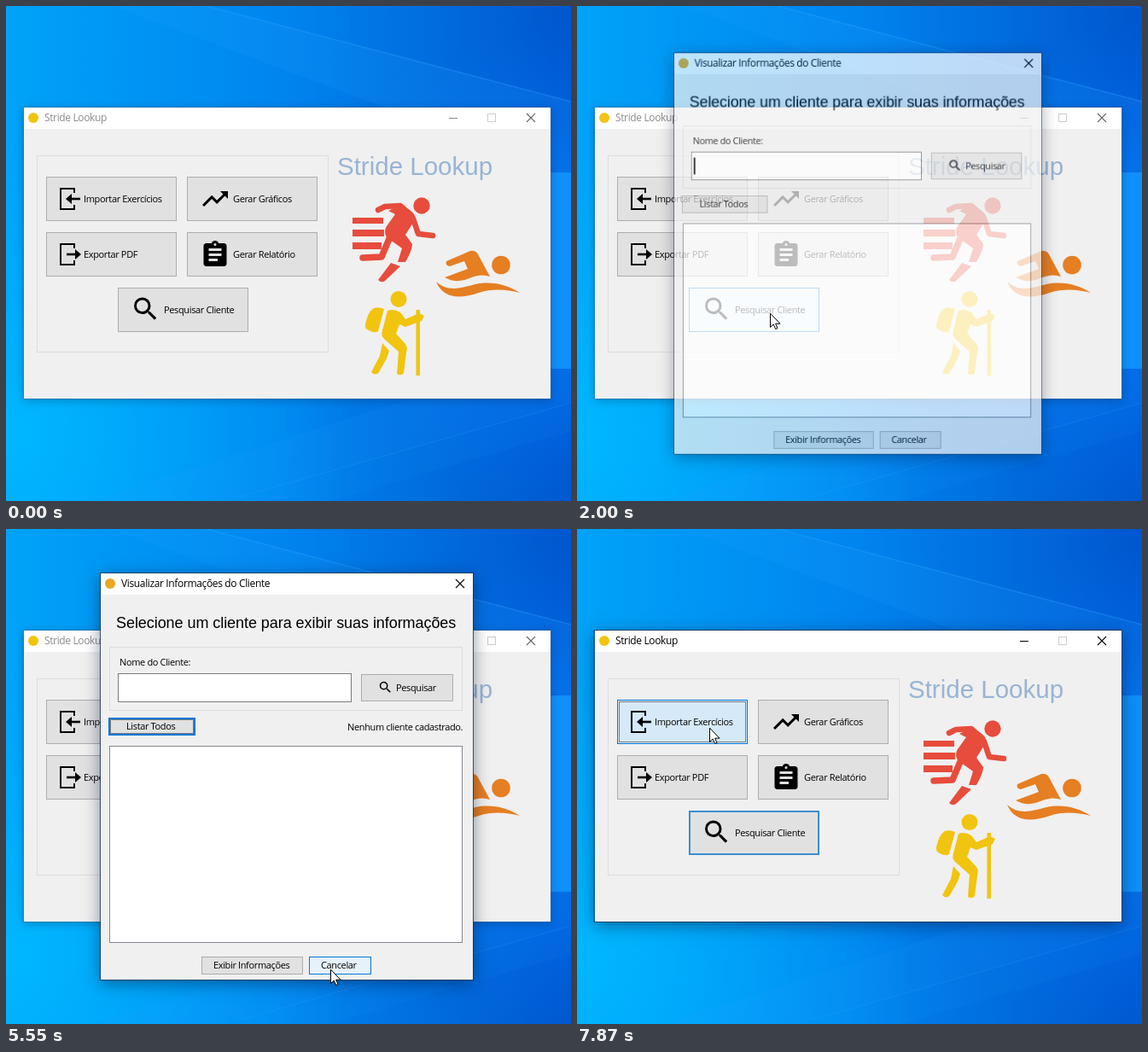
An HTML page with a canvas that plays this animation: 662 px wide and 580 px high, repeating every 8 s.

```html
<!DOCTYPE html>
<html lang="pt">
<head>
<meta charset="utf-8">
<title>Stride Lookup</title>
<style>
html, body { margin: 0; width: 100%; height: 100%; overflow: hidden; background: #0086f0; }
canvas { display: block; }
</style>
</head>
<body>
<canvas id="stage" width="662" height="580"></canvas>
<script>
const W = 662, H = 580, LOOP = 8000, TICK = 77.26;
const APP = 'Stride Lookup';
const UI = '11px "Open Sans", "Noto Sans", sans-serif';
const CAPTION = '12px "Open Sans", "Noto Sans", sans-serif';
const ARIAL = '"Liberation Sans", Arial, sans-serif';
const BLUE = [0, 120, 215];

const layer = () => Object.assign(document.createElement('canvas'), { width: W, height: H });
const screen = document.getElementById('stage').getContext('2d');
const wallpaper = layer(), dialogLayer = layer();

const clamp = v => Math.max(0, Math.min(1, v));
const ramp = (k, a, b) => clamp((k - a) / (b - a));
const within = (k, a, b) => k >= a && k <= b;
const ease = p => p * p * (3 - 2 * p);
const mix = (a, b, p) => `rgb(${a.map((v, i) => Math.round(v + (b[i] - v) * p))})`;

// ---------- drawing helpers ----------
function box(g, x, y, w, h, fill, border) {
  if (fill) { g.fillStyle = fill; g.fillRect(x, y, w, h); }
  if (border) { g.strokeStyle = border; g.lineWidth = 1; g.strokeRect(x + .5, y + .5, w - 1, h - 1); }
}

function text(g, str, x, y, font = UI, color = '#000', spacing = -.36) {
  g.font = font;
  g.fillStyle = color;
  g.letterSpacing = spacing + 'px';
  g.fillText(str, x, y);
}

function line(g, pts, width, color, cap = 'round') {
  g.beginPath();
  pts.forEach(p => g.lineTo(...p));
  g.lineWidth = width;
  g.strokeStyle = color;
  g.lineCap = cap;
  g.lineJoin = cap === 'round' ? 'round' : 'miter';
  g.stroke();
}

function shape(g, d, color) {
  g.fillStyle = color;
  g.fill(new Path2D(d), 'evenodd');
}

function dot(g, x, y, r, color) {
  g.beginPath();
  g.arc(x, y, r, 0, 7);
  g.fillStyle = color;
  g.fill();
}

function icon(g, d, x, y, scale) {
  g.save();
  g.translate(x, y);
  g.scale(scale, scale);
  shape(g, d, '#000');
  g.restore();
}

const SEARCH = 'M15.5 14h-.79l-.28-.27A6.47 6.47 0 0 0 16 9.5 6.5 6.5 0 1 0 9.5 16c1.61 0 3.09-.59 4.23-1.57l.27.28v.79l5 4.99L20.49 19zm-6 0C7 14 5 12 5 9.5S7 5 9.5 5 14 7 14 9.5 12 14 9.5 14z';
const TREND = 'M16 6l2.29 2.29-4.88 4.88-4-4L2 16.59 3.41 18l6-6 4 4 6.3-6.29L22 12V6z';
const REPORT = 'M19 3h-4.18C14.4 1.84 13.3 1 12 1s-2.4.84-2.82 2H5c-1.1 0-2 .9-2 2v14c0 1.1.9 2 2 2h14c1.1 0 2-.9 2-2V5c0-1.1-.9-2-2-2zm-7 0a1 1 0 0 1 0 2 1 1 0 0 1 0-2zm2 14H7v-2h7zm3-4H7v-2h10zm0-4H7V7h10z';

function doorIcon(g, y, out) {
  line(g, [[80, y - 7], [80, y - 12], [64, y - 12], [64, y + 12], [80, y + 12], [80, y + 7]], 2, '#000', 'butt');
  line(g, out ? [[71, y], [82, y]] : [[76, y], [87, y]], 2.6, '#000', 'butt');
  shape(g, out ? `M81 ${y - 6}L88 ${y}L81 ${y + 6}z` : `M77 ${y - 6}L70 ${y}L77 ${y + 6}z`, '#000');
}

function button(g, x, y, w, h, { hot = 0, press = 0, focus = false, glow = 0 } = {}) {
  const base = [225, 225, 225], warm = [229, 241, 251];
  const fill = press ? mix(warm, [204, 228, 247], press) : mix(base, warm, hot);
  box(g, x, y, w, h, fill, mix([173, 173, 173], BLUE, Math.max(hot, press, glow)));
  if (glow) box(g, x + 1, y + 1, w - 2, h - 2, null, mix(base, BLUE, glow));
  if (focus) {
    g.setLineDash([1, 1]);
    box(g, x + 2, y + 2, w - 4, h - 4, null, '#111');
    g.setLineDash([]);
  }
}

function frame(g, x, y, w, h, titleHeight, active) {
  g.save();
  g.shadowColor = `rgba(0,20,50,${active ? .5 : .3})`;
  g.shadowBlur = active ? 18 : 10;
  g.shadowOffsetY = active ? 4 : 2;
  box(g, x, y, w, h, '#f0f0f0');
  g.restore();
  box(g, x, y, w, titleHeight, '#fff');
  box(g, x - 1, y - 1, w + 2, h + 2, null, active ? 'rgba(25,50,75,.8)' : 'rgba(70,100,130,.45)');
}

function cross(g, x, y, color) {
  line(g, [[x - 5, y - 5], [x + 5, y + 5]], 1.1, color, 'butt');
  line(g, [[x + 5, y - 5], [x - 5, y + 5]], 1.1, color, 'butt');
}

// ---------- wallpaper ----------
function paintWallpaper(g) {
  const fill = (gradient, ...stops) => {
    stops.forEach(([at, color]) => gradient.addColorStop(at, color));
    g.fillStyle = gradient;
    g.fillRect(0, 0, W, H);
  };
  fill(g.createLinearGradient(0, 0, W, 0), [0, '#00a3f8'], [.5, '#0084ef'], [1, '#0056ce']);
  fill(g.createRadialGradient(0, 500, 0, 0, 500, 400), [0, 'rgba(0,186,255,.9)'], [1, 'rgba(0,170,255,0)']);
  fill(g.createRadialGradient(W, 310, 0, W, 310, 290), [0, 'rgba(0,130,255,.75)'], [1, 'rgba(0,120,255,0)']);
  const beam = (d, alpha) => shape(g, d, `rgba(40,160,255,${alpha})`);
  beam('M235 0L662 112V200L125 0z', .13);
  line(g, [[235, 0], [662, 112]], 1.5, 'rgba(60,170,255,.3)');
  beam('M260 580L662 465V400L100 580z', .1);
  beam('M380 580L662 498V465L260 580z', .06);
  line(g, [[275, 575], [662, 465]], 1.2, 'rgba(60,170,255,.18)');
  box(g, 613, 195, 230, 230, '#0f90fa');
}

// ---------- sport figures ----------
function runner(g) {
  const c = '#e74c3c';
  dot(g, 487, 234, 9.7, c);
  box(g, 406, 248, 36, 7, c);
  box(g, 406, 262, 37, 8, c);
  box(g, 406, 277, 34, 8, c);
  line(g, [[436, 239], [444, 235], [462, 234], [472, 243]], 6.5, c);
  shape(g, 'M460 234Q478 238 480 249L468 268L476 279Q476 286 468 300H459L464 284L446 271Q442 264 446 258L456 244L448 240z', c);
  line(g, [[477, 249], [483, 267], [500, 269]], 6.5, c);
  line(g, [[451, 268], [440, 294], [418, 295]], 7.5, c);
  shape(g, 'M451 301L462 305L444 322Q440 325 436 321z', c);
}

function swimmer(g) {
  const c = '#e67e22';
  dot(g, 580, 303.5, 10.8, c);
  shape(g, 'M516 299L544 287Q550 286 553 291L567 317Q556 313 543 319Q528 326 514 318L541 308L537 299L520 305Q514 304 516 299z', c);
  shape(g, 'M504 323C518 336 534 330 550 326C570 322 588 327 602 336C586 332 570 331 554 336C530 344 512 342 504 323z', c);
}

function hiker(g) {
  const c = '#f1c40f';
  dot(g, 460, 343.5, 9.5, c);
  shape(g, 'M421 373Q424 358 431 354Q437 352 443 355L436 381Q432 384 425 380Q420 378 421 373z', c);
  shape(g, 'M447 357Q454 354 462 359L468 367L484 360L490 363L487 369L468 376L461 373L457 384L468 396Q471 400 469 406L466 430Q463 434 458 431L460 405L443 390Q439 386 441 380z', c);
  shape(g, 'M441 395L449 404L446 413L437 429Q433 434 428 429L438 410z', c);
  box(g, 480.5, 356, 4.5, 77, c);
}

// ---------- windows ----------
function mainWindow(g, k) {
  const active = within(k, 14, 16) || k >= 74;
  const ink = active ? '#000' : '#8c8c8c';
  frame(g, 21, 119, 617, 341, 25, active);
  dot(g, 32, 131, 6, '#f1c40f');
  text(g, APP, 45, 135, CAPTION, ink);
  line(g, [[519, 131.5], [529, 131.5]], 1, ink, 'butt');
  box(g, 564, 126, 10, 10, null, '#ccc');
  cross(g, 615, 131, active ? '#000' : '#666');

  box(g, 36, 175, 342, 231, null, '#dcdcdc');
  button(g, 47, 200, 153, 52, {
    hot: ramp(k, 87, 91),
    press: k >= 95 ? .6 : k >= 91 ? 1 : 0,
    focus: k >= 91
  });
  button(g, 212, 200, 153, 52);
  button(g, 47, 265, 153, 52);
  button(g, 212, 265, 153, 52);
  button(g, 131, 330, 153, 52, {
    hot: ramp(k, 5, 7) * (1 - ramp(k, 76, 88)),
    press: within(k, 14, 16) ? 1 : 0,
    focus: within(k, 14, 16) || within(k, 74, 90),
    glow: k >= 78 ? .78 + .15 * Math.cos((k - 78) / 4) : 0
  });
  doorIcon(g, 226, false);
  doorIcon(g, 291, true);
  icon(g, TREND, 227, 208, 1.5);
  icon(g, REPORT, 227, 273.5, 1.5);
  icon(g, SEARCH, 145.5, 337, 1.5);
  text(g, 'Importar Exercícios', 91, 230);
  text(g, 'Gerar Gráficos', 266, 230);
  text(g, 'Exportar PDF', 91, 295);
  text(g, 'Gerar Relatório', 266, 295);
  text(g, 'Pesquisar Cliente', 185, 360);

  text(g, APP, 388, 198, '29.5px ' + ARIAL, '#98b4d4', 0);
  runner(g);
  swimmer(g);
  hiker(g);
}

function dialog(g, k) {
  g.clearRect(0, 0, W, H);
  frame(g, 111, 52, 436, 476, 25, k < 74);
  dot(g, 122, 64, 6, '#e9a820');
  text(g, 'Visualizar Informações do Cliente', 135, 68, CAPTION);
  cross(g, 532, 64, '#000');
  text(g, 'Selecione um cliente para exibir suas informações', 129, 116, '18px ' + ARIAL, '#000', -.06);

  box(g, 121, 138, 414, 75, null, '#dcdcdc');
  text(g, 'Nome do Cliente:', 133, 160);
  box(g, 131, 169, 274, 34, '#fff', '#7a7a7a');
  if (k < 24 || within(k, 31, 37)) box(g, 134, 176, 2, 20, '#000');
  button(g, 416, 170, 108, 32);
  icon(g, SEARCH, 435.5, 176.5, .75);
  text(g, 'Pesquisar', 457, 190);

  button(g, 120, 221, 102, 21, {
    hot: ramp(k, 36, 39) * (1 - ramp(k, 52, 60)),
    press: within(k, 41, 43) ? .35 : 0,
    focus: within(k, 41, 71),
    glow: within(k, 52, 71) ? .92 + .08 * Math.cos((k - 65) / 3) : 0
  });
  text(g, 'Listar Todos', 141, 235);
  if (k >= 44) text(g, 'Nenhum cliente cadastrado.', 400, 236);
  box(g, 121, 254, 414, 231, '#fff', '#828790');

  button(g, 229, 501, 119, 21);
  text(g, 'Exibir Informações', 243, 515);
  button(g, 355, 501, 73, 21, {
    hot: ramp(k, 58, 61),
    press: within(k, 72, 74) ? 1 : 0,
    focus: k >= 72,
    glow: k >= 75 ? 1 : 0
  });
  text(g, 'Cancelar', 369, 515);
}

function showDialog(g, k) {
  const closing = k > 73;
  const since = (k - 17) * TICK;
  const alpha = closing ? 1 - (k - 73) * .287 : clamp(since / 210);
  const scale = closing ? 1 - (k - 73) * .0146 : 1 - .1 * (1 - clamp(since / 245)) ** 2;
  if (alpha <= 0) return;
  dialog(dialogLayer.getContext('2d'), k);
  g.save();
  g.globalAlpha = alpha;
  g.translate(328.5, 289.5);
  g.scale(scale, scale);
  g.drawImage(dialogLayer, -328.5, -289.5);
  g.restore();
}

// ---------- pointer ----------
const MOVES = [
  { from: 0, to: 8, a: [467, 480], b: [226, 360] },
  { from: 27, to: 38, a: [226, 360], b: [188, 232] },
  { from: 50, to: 61, a: [188, 232], b: [380, 516] },
  { from: 79, to: 90, a: [380, 516], b: [155, 233] }
];
const CLICKS = [[14, 16], [41, 43], [72, 74], [91, 94]];
const ARROW = new Path2D('M.5.5V16.5L4.2 13L6.7 18.5L9 17.5L6.6 12.2H11.6z');

function pointer(g, k) {
  if (k < 0) return;
  const { from, to, a, b } = MOVES.filter(m => k >= m.from).pop();
  const p = ease(ramp(k, from, to));
  const x = a[0] + (b[0] - a[0]) * p, y = a[1] + (b[1] - a[1]) * p;
  if (CLICKS.some(([s, e]) => within(k, s, e))) dot(g, x, y, 12, 'rgba(226,222,0,.65)');
  g.save();
  g.translate(Math.round(x), Math.round(y));
  g.fillStyle = '#fff';
  g.fill(ARROW);
  g.strokeStyle = '#000';
  g.lineWidth = 1;
  g.lineJoin = 'miter';
  g.stroke(ARROW);
  g.restore();
}

// ---------- loop ----------
function draw(t) {
  const k = Math.floor((t - 518) / TICK);
  screen.drawImage(wallpaper, 0, 0);
  if (k > 73) showDialog(screen, k);
  mainWindow(screen, k);
  if (within(k, 17, 73)) showDialog(screen, k);
  pointer(screen, k);
}

paintWallpaper(wallpaper.getContext('2d'));
const start = performance.now();
function tick() {
  draw((performance.now() - start) % LOOP);
  requestAnimationFrame(tick);
}
tick();
</script>
</body>
</html>
```
